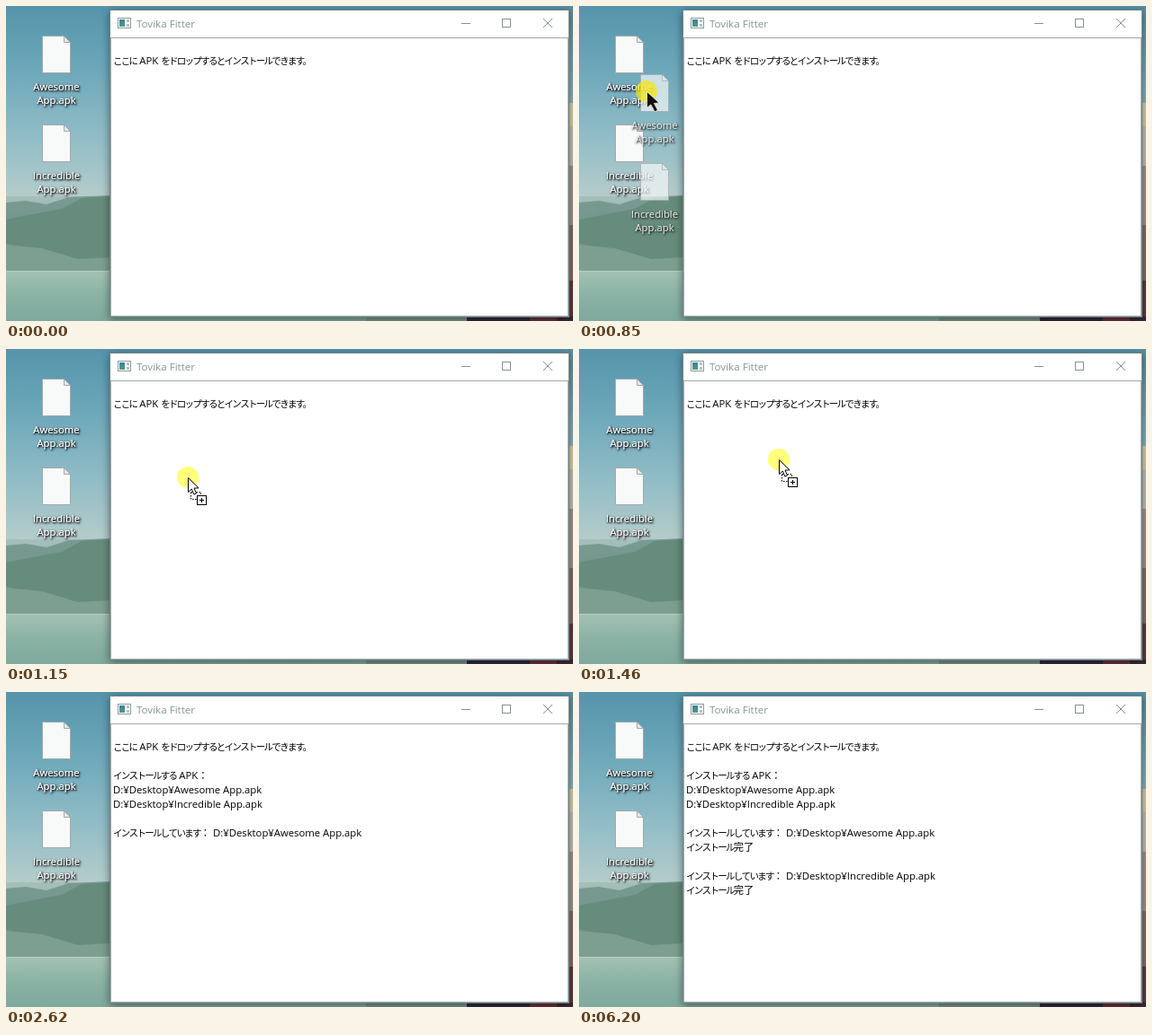
These frames come from a looping animation (630x351 px, 7.38 s). An HTML page with a canvas:

```html
<!DOCTYPE html>
<html lang="ja">
<head>
<meta charset="utf-8">
<title>Tovika Fitter</title>
<style>
html, body { margin: 0; width: 100%; height: 100%; overflow: hidden; }
canvas { display: block; width: 630px; height: 351px; }
</style>
</head>
<body>
<canvas id="stage" width="630" height="351"></canvas>
<script>
const W = 630, H = 351, LOOP = 7380;
const canvas = document.getElementById('stage');
const dpr = window.devicePixelRatio || 1;
canvas.width = W * dpr;
canvas.height = H * dpr;
const ctx = canvas.getContext('2d');
ctx.scale(dpr, dpr);

const LATIN = '11.3px "Open Sans", "Noto Sans CJK JP", "Noto Sans CJK", sans-serif';
const TITLE = '11.6px "Open Sans", "Noto Sans", sans-serif';
const KANA = '10.5px "Noto Sans CJK JP", "Noto Sans CJK", sans-serif';

const PRESS = 770, DROP = 1920, LEAVE = 2550, GONE = 2620;
const GRAB = { x: 47, y: 52 };

// Pointer stops: time, x, y
const path = [
  [460, 1, 289], [530, 14, 210], [610, 32, 112], [690, 46, 55], [770, 47, 52],
  [850, 75, 95], [920, 105, 138], [1000, 139, 150], [1075, 174, 149], [1150, 202, 143],
  [1230, 208, 138], [1310, 215, 130], [1380, 220, 125], [1460, 222, 123],
  [2320, 225, 150], [2400, 230, 212], [2470, 235, 286], [2550, 238, 347]
];

// Log lines: time, row, text
const log = [
  [0, 0, 'ここに APK をドロップするとインストールできます。'],
  [DROP, 2, 'インストールする APK：'],
  [DROP, 3, 'D:¥Desktop¥Awesome App.apk'],
  [DROP, 4, 'D:¥Desktop¥Incredible App.apk'],
  [DROP, 6, 'インストールしています： D:¥Desktop¥Awesome App.apk'],
  [3880, 7, 'インストール完了'],
  [3880, 9, 'インストールしています： D:¥Desktop¥Incredible App.apk'],
  [6200, 10, 'インストール完了']
];

function rect(x, y, w, h, fill) {
  ctx.fillStyle = fill;
  ctx.fillRect(x, y, w, h);
}

function frame(x, y, w, h, color) {
  ctx.strokeStyle = color;
  ctx.lineWidth = 1;
  ctx.strokeRect(x + .5, y + .5, w - 1, h - 1);
}

function poly(points, fill, stroke, width = 1) {
  ctx.beginPath();
  points.forEach(([x, y]) => ctx.lineTo(x, y));
  ctx.closePath();
  if (fill) { ctx.fillStyle = fill; ctx.fill(); }
  if (stroke) { ctx.strokeStyle = stroke; ctx.lineWidth = width; ctx.stroke(); }
}

function line(x1, y1, x2, y2, color, width = 1) {
  ctx.strokeStyle = color;
  ctx.lineWidth = width;
  ctx.beginPath();
  ctx.moveTo(x1, y1);
  ctx.lineTo(x2, y2);
  ctx.stroke();
}

function gradient(y1, y2, ...colors) {
  const g = ctx.createLinearGradient(0, y1, 0, y2);
  colors.forEach((c, i) => g.addColorStop(i / (colors.length - 1), c));
  return g;
}

function wallpaper() {
  rect(0, 0, W, 215, gradient(0, 215, '#5594ab', '#6da8ba', '#8fbcc6', '#b6cdcb'));
  rect(0, 212, W, 84, gradient(212, 296, '#a5bfba', '#84a39a'));
  poly([[0, 219], [22, 217], [45, 221], [70, 213], [116, 211], [116, 296], [0, 296]],
    gradient(211, 296, '#789a92', '#6e9184'));
  poly([[0, 238], [30, 232], [62, 226], [84, 214], [116, 212], [116, 282], [60, 284], [0, 264]], '#668c7d');
  poly([[0, 266], [40, 270], [80, 282], [116, 280], [116, 295], [0, 295]], '#7c9f91');
  rect(0, 295, W, 56, gradient(295, 351, '#a3c2b3', '#8ab2a5', '#7fa99d'));
  rect(0, 295, 116, 1, '#b6cfbf');

  rect(624, 0, 6, 108, gradient(0, 108, '#5b8e9c', '#8db4bd'));
  rect(624, 108, 6, 26, '#d8cda6');
  rect(624, 134, 6, 44, '#c8beb3');
  rect(624, 178, 6, 66, '#a49489');
  rect(624, 244, 6, 62, '#876c65');
  rect(624, 306, 6, 45, '#603a3d');
  rect(400, 346, 112, 5, '#78938b');
  rect(512, 346, 70, 5, '#30283f');
  rect(582, 346, 30, 5, '#6a2f3c');
  rect(612, 346, 18, 5, '#3a2936');
}

function label(text, x, y) {
  ctx.save();
  ctx.font = LATIN;
  ctx.textAlign = 'center';
  ctx.fillStyle = '#fff';
  ctx.shadowColor = '#000';
  ctx.shadowBlur = 3 * dpr;
  ctx.shadowOffsetX = ctx.shadowOffsetY = dpr;
  ctx.fillText(text, x, y);
  ctx.shadowBlur = 2 * dpr;
  ctx.fillText(text, x, y);
  ctx.restore();
}

function file(name, x, y) {
  poly([[x + .5, y + .5], [x + 24.5, y + .5], [x + 31.5, y + 7.5], [x + 31.5, y + 41.5], [x + .5, y + 41.5]],
    '#f8f9f9', '#a2a9aa');
  poly([[x + 24.5, y + .5], [x + 24.5, y + 7.5], [x + 31.5, y + 7.5]], '#e4e8e8', '#a2a9aa');
  label(name, x + 16, y + 61);
  label('App.apk', x + 16, y + 76);
}

function files(dx = 0, dy = 0) {
  file('Awesome', 40 + dx, 33 + dy);
  file('Incredible', 40 + dx, 132 + dy);
}

function mixedText(text, x, y) {
  for (const run of text.match(/[ぁ-ヿ。]+|[^ぁ-ヿ。]+/g)) {
    const kana = /[ぁ-ヿ]/.test(run);
    ctx.font = kana ? KANA : LATIN;
    ctx.letterSpacing = kana ? '-1.7px' : '0px';
    ctx.fillText(run, x, y);
    x += ctx.measureText(run).width;
  }
  ctx.letterSpacing = '0px';
}

function appWindow(t) {
  ctx.save();
  ctx.shadowColor = 'rgba(0,0,0,.45)';
  ctx.shadowBlur = 9 * dpr;
  ctx.shadowOffsetY = 2 * dpr;
  rect(115, 4, 511, 343, '#fff');
  ctx.restore();
  frame(115, 4, 511, 343, '#6f8587');

  rect(124, 13, 15, 12, '#fff');
  frame(124, 13, 15, 12, '#8b9b9b');
  rect(126, 15, 6, 8, gradient(15, 23, '#3f7f9c', '#4f9b83'));
  rect(134, 15, 3, 3, '#b4c0c0');
  rect(134, 20, 3, 3, '#b4c0c0');
  ctx.font = TITLE;
  ctx.fillStyle = '#839790';
  ctx.fillText('Tovika Fitter', 145, 24);

  const gray = '#87938f';
  line(506, 19.5, 516, 19.5, gray);
  frame(551, 14, 10, 10, gray);
  line(597, 14, 607, 24, gray);
  line(607, 14, 597, 24, gray);

  const hover = t >= DROP && t < LEAVE;
  frame(116, 35, 509, 311, hover ? '#6faae6' : '#a0aaaa');

  ctx.fillStyle = '#000';
  for (const [start, row, text] of log) {
    if (t >= start) mixedText(text, 119, 65 + row * 16);
  }
}

function arrow(x, y, fill, edge) {
  const shape = [[0, 0], [0, 16], [3.8, 12.6], [6.4, 18.6], [9, 17.5], [6.5, 11.6], [11.5, 11.4]];
  poly(shape.map(([a, b]) => [x + a + .5, y + b + .5]), fill, edge);
}

function bigArrow(x, y) {
  const shape = [[0, 0], [0, 18], [4.4, 14.4], [8.6, 22.4], [12, 20.6], [8, 13], [13.5, 12.4]];
  poly(shape.map(([a, b]) => [x + a + .5, y + b + .5]), '#150c0c', '#f4f4ec', .8);
}

function copyPointer(x, y) {
  ctx.setLineDash([1.5, 1.5]);
  frame(x + 3, y + 16, 12, 9, '#000');
  ctx.setLineDash([]);
  arrow(x, y, '#fff', '#000');
  rect(x + 10, y + 20, 11, 11, '#fff');
  frame(x + 10, y + 20, 11, 11, '#000');
  rect(x + 13, y + 25, 5, 1, '#000');
  rect(x + 15, y + 23, 1, 5, '#000');
}

function beam(x, y) {
  rect(x - 1, y - 8, 2, 17, '#000');
  for (const top of [y - 9, y + 8]) {
    rect(x - 3, top, 2, 1, '#000');
    rect(x + 1, top, 2, 1, '#000');
  }
}

function pointer(t) {
  if (t < path[0][0] || t >= GONE) return;
  const [, x, y] = path.filter(p => p[0] <= t).pop();
  const inside = x > 116 && y < 346;
  if (t >= PRESS && t < DROP) {
    if (!inside) {
      ctx.globalAlpha = .68;
      files(x - GRAB.x, y - GRAB.y);
      ctx.globalAlpha = 1;
    }
    ctx.fillStyle = inside ? 'rgba(255,255,0,.52)' : 'rgba(246,232,0,.68)';
    ctx.beginPath();
    ctx.arc(x, y, 12, 0, Math.PI * 2);
    ctx.fill();
    if (inside) copyPointer(x, y);
    else bigArrow(x, y);
  } else if (inside) {
    beam(x, y + (t < 2320 ? 1 : 0));
  } else {
    bigArrow(x, y);
  }
}

function draw(t) {
  ctx.clearRect(0, 0, W, H);
  wallpaper();
  files();
  appWindow(t);
  pointer(t);
}

const begin = performance.now();
function tick() {
  draw((performance.now() - begin) % LOOP);
  requestAnimationFrame(tick);
}
tick();
</script>
</body>
</html>
```
